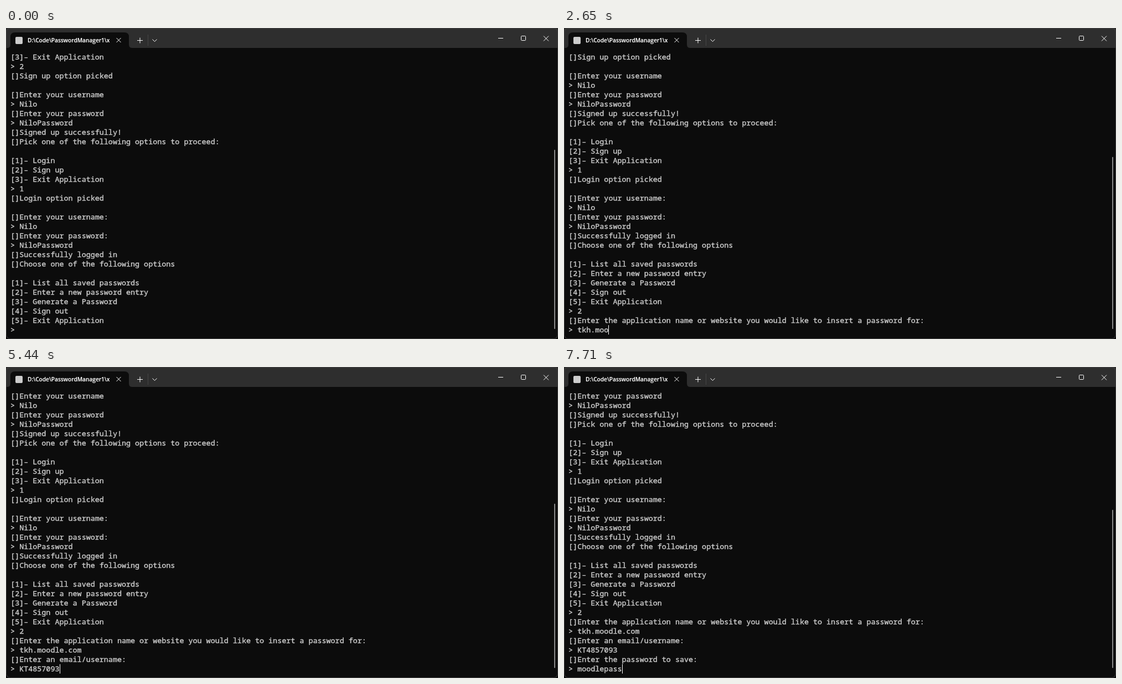
An HTML page for the animation above (8 s loop, 997 by 562 pixels).

```html
<!DOCTYPE html>
<html lang="en">
<head>
<meta charset="utf-8">
<title>Terminal</title>
<style>
  html, body { margin: 0; width: 100%; height: 100%; overflow: hidden; background: #0c0c0c; }
  #stage { position: absolute; left: 0; top: 0; width: 997px; height: 562px; overflow: hidden; }
  svg { position: absolute; left: 0; top: 0; }
  #title {
    position: absolute; left: 39px; top: 14px; width: 147.5px; overflow: hidden; white-space: pre;
    font: 600 10.15px/17px "Open Sans", "Noto Sans", sans-serif; color: #fff;
    -webkit-text-stroke: .15px #fff;
  }
  #screen {
    position: absolute; left: 8.1px; top: 44px; margin: 0; color: #ccc;
    font: 500 13.4px/17px "Noto Sans Mono", "DejaVu Sans Mono", monospace;
    font-variant-ligatures: none; -webkit-text-stroke: .4px #ccc;
  }
  #caret { position: absolute; top: 537px; width: 1px; height: 17px; background: #fff; }
  #thumb { position: absolute; left: 990px; width: 2px; background: #8a8a8a; border-radius: 1px; }
</style>
</head>
<body>
<div id="stage">
  <svg width="997" height="562" fill="none" stroke="#fff">
    <path d="M0 0H997V36H0Z" fill="#2e2e2e" stroke="none"/>
    <path d="M2 36Q8 36 8 30V16Q8 8 16 8H214Q222 8 222 16V30Q222 36 228 36Z" fill="#0c0c0c" stroke="none"/>
    <rect x="17" y="16" width="13" height="13" rx="2" fill="#ccc" stroke="none"/>
    <path d="M199.5 18l8 8m0-8l-8 8M237 22.5h10M242 17.5v10M264.5 20.5l4 4 4-4"/>
    <path d="M256.5 12v20" stroke="#454545"/>
    <path d="M889 18.5h9M971 14.5l9 9m0-9l-9 9"/>
    <rect x="930.5" y="14.5" width="8" height="8" rx="1"/>
    <rect x=".5" y=".5" width="996" height="561" rx="7" stroke="#414141"/>
  </svg>
  <div id="title">D:\Code\PasswordManager1\x64</div>
  <pre id="screen"></pre>
  <div id="caret"></div>
  <div id="thumb"></div>
</div>
<script>
const LOOP = 8000, ROWS = 30;
const history = `[3]– Exit Application
> 2
[]Sign up option picked

[]Enter your username
> Nilo
[]Enter your password
> NiloPassword
[]Signed up successfully!
[]Pick one of the following options to proceed:

[1]– Login
[2]– Sign up
[3]– Exit Application
> 1
[]Login option picked

[]Enter your username:
> Nilo
[]Enter your password:
> NiloPassword
[]Successfully logged in
[]Choose one of the following options

[1]– List all saved passwords
[2]– Enter a new password entry
[3]– Generate a Password
[4]– Sign out
[5]– Exit Application`.split("\n");

// Each prompt: when it opens, its question, the answer and the time of each key.
const prompts = [
  { at: 0, thumb: 220, answer: "2", keys: [790] },
  { at: 1250, thumb: 233, answer: "tkh.moodle.com",
    ask: "[]Enter the application name or website you would like to insert a password for:",
    keys: [1790, 1920, 2060, 2120, 2390, 2520, 2650, 2790, 2860, 3050, 3180, 3320, 3390, 3460] },
  { at: 3650, thumb: 247, answer: "KT4857093", ask: "[]Enter an email/username:",
    keys: [4180, 4310, 4510, 4710, 4840, 5110, 5220, 5330, 5440] },
  { at: 5710, thumb: 258, answer: "moodlepass", ask: "[]Enter the password to save:",
    keys: [6510, 6640, 6780, 6910, 7050, 7180, 7310, 7510, 7610, 7710] }
];
const hidden = [[0, 260], [6310, 6510]];
const [screenEl, caret, thumb] = ["screen", "caret", "thumb"].map(id => document.getElementById(id));

function draw(t) {
  const lines = [...history];
  let typed, current;
  for (const p of prompts) {
    if (t < p.at) break;
    current = p;
    typed = p.keys.filter(k => k <= t).length;
    if (p.ask) lines.push(p.ask);
    lines.push("> " + p.answer.slice(0, typed));
  }
  const text = lines.slice(-ROWS).join("\n");
  if (screenEl.textContent !== text) screenEl.textContent = text;
  caret.style.left = Math.round(8.1 + 8.04 * (typed + 2)) + "px";
  caret.style.opacity = hidden.some(([a, b]) => t >= a && t < b) ? 0 : 1;
  thumb.style.top = current.thumb + "px";
  thumb.style.height = 544 - current.thumb + "px";
}

const start = performance.now();
function tick() {
  draw((performance.now() - start) % LOOP);
  requestAnimationFrame(tick);
}
tick();
</script>
</body>
</html>
```
